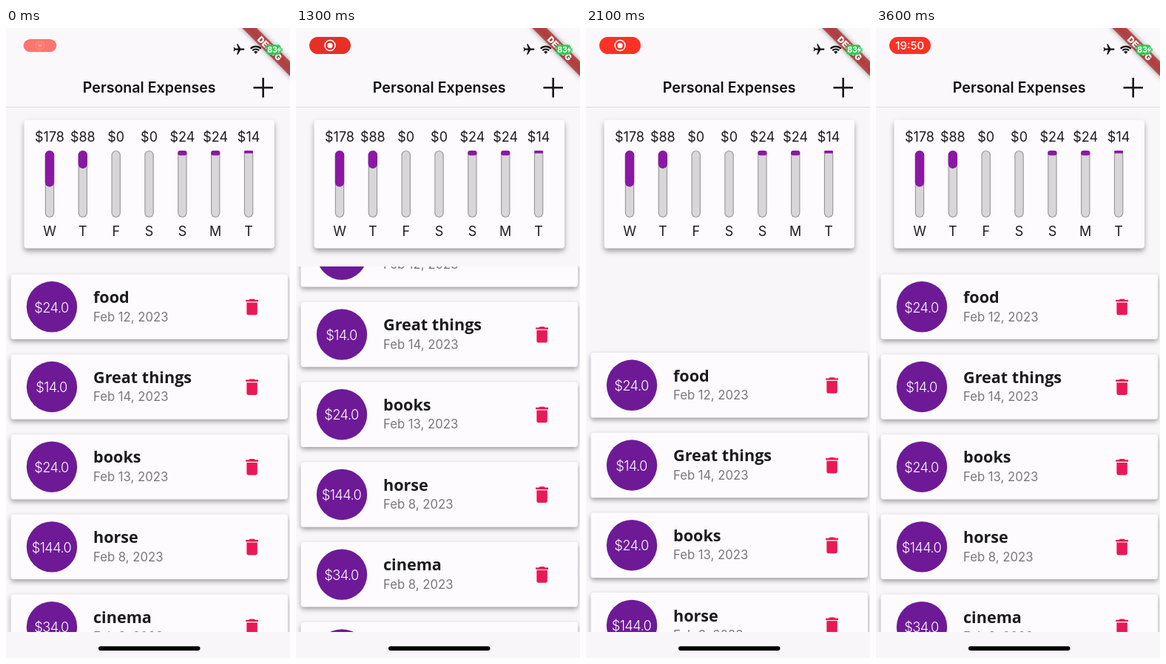
Recreate the animation shown at these times as an HTML page with a canvas. Size 384 by 848 pixels, loop 3700 ms.

```html
<!DOCTYPE html>
<html lang="en">
<head>
<meta charset="utf-8">
<title>Personal Expenses</title>
<style>
html, body { margin: 0; width: 100%; height: 100%; overflow: hidden; background: #f9f6fa; }
canvas { display: block; width: 384px; height: 848px; }
</style>
</head>
<body>
<canvas id="stage"></canvas>
<script>
const W = 384, H = 848, LOOP = 3700, STEP = 100;
const canvas = document.getElementById('stage');
const g = canvas.getContext('2d');
const dpr = window.devicePixelRatio || 1;
canvas.width = W * dpr;
canvas.height = H * dpr;

const BG = '#f9f6fa', CARD = '#fdfbfe', INK = '#1c1b1e';
const LIST_TOP = 321, LIST_BOTTOM = 813, PITCH = 107.7;
const UI = 'Inter, sans-serif';

const items = [
  ['food', '$24.0', 'Feb 12, 2023'],
  ['Great things', '$14.0', 'Feb 14, 2023'],
  ['books', '$24.0', 'Feb 13, 2023'],
  ['horse', '$144.0', 'Feb 8, 2023'],
  ['cinema', '$34.0', 'Feb 8, 2023'],
  ['dog', '$88.0', 'Feb 9, 2023']
];
const days = [['W', 178], ['T', 88], ['F', 0], ['S', 0], ['S', 24], ['M', 24], ['T', 14]];
const total = days.reduce((sum, d) => sum + d[1], 0);

const trash = new Path2D('M6 19c0 1.1.9 2 2 2h8c1.1 0 2-.9 2-2V7H6v12zM19 4h-3.5l-1-1h-5l-1 1H5v2h14V4z');
const plane = new Path2D('M21 16v-2l-8-5V3.5c0-.83-.67-1.5-1.5-1.5S10 2.67 10 3.5V9l-8 5v2l8-2.5V19l-2 1.5V22l3.5-1 3.5 1v-1.5L13 19v-5.5l8 2.5z');
const bolt = new Path2D('M3.4 0L0 5h2.2L1.4 9L5 3.6H2.7z');

const clamp = x => Math.max(0, Math.min(1, x));
const ramp = (t, a, b) => clamp((t - a) / (b - a));
const mix = (a, b, u) => a + (b - a) * u;

function text(str, x, y, font, color, align = 'left', spacing = 0) {
  g.font = font;
  g.fillStyle = color;
  g.textAlign = align;
  g.letterSpacing = spacing + 'px';
  g.fillText(str, x, y);
}

function box(x, y, w, h, r, color) {
  g.fillStyle = color;
  g.beginPath();
  g.roundRect(x, y, w, h, r);
  g.fill();
}

function disc(x, y, r, color) {
  g.fillStyle = color;
  g.beginPath();
  g.arc(x, y, r, 0, Math.PI * 2);
  g.fill();
}

function icon(path, x, y, scale, color, angle = 0) {
  g.save();
  g.translate(x, y);
  g.rotate(angle);
  g.scale(scale, scale);
  g.translate(-12, -12);
  g.fillStyle = color;
  g.fill(path);
  g.restore();
}

function card(x, y, w, h, drop) {
  g.save();
  g.shadowColor = 'rgba(0,0,0,.36)';
  g.shadowBlur = (drop + 3) * dpr;
  g.shadowOffsetY = drop * dpr;
  box(x, y, w, h, 4, CARD);
  g.restore();
}

// Flick up, pull down past the top, then a critically damped spring back.
function scrollAt(t) {
  if (t < 1600) return -161 * (1 - (1 - ramp(t, 1200, 1600)) ** 2);
  if (t < 2100) return mix(-161, 105.5, (1 - Math.cos(Math.PI * ramp(t, 1600, 2100))) / 2);
  const x = (t - 2100) * 0.0115;
  return 105.5 * (1 + x) * Math.exp(-x);
}

function drawChart() {
  card(24.5, 123.5, 338.5, 173, 4);
  days.forEach(([day, sum], i) => {
    const x = 59 + i * 44.85;
    text('$' + sum, x, 152.5, '18px ' + UI, INK, 'center');
    text(day, x, 279.5, '18px ' + UI, INK, 'center');
    box(x - 6.2, 165, 12.4, 90, 6.2, '#969498');
    box(x - 5.1, 166.1, 10.2, 87.8, 5.1, '#d8d6d9');
    if (sum) box(x - 6.2, 165, 12.4, 90 * sum / total, 6.2, '#8b18a3');
  });
}

function drawItem([name, amount, date], y) {
  card(6.5, y, 374.5, 87.5, 3);
  disc(62, y + 43.8, 34.2, '#6e1a97');
  text(amount, 61.5, y + 51, '300 18.3px ' + UI, '#fff', 'center', -0.6);
  text(name, 118, y + 38.5, '700 21.6px "Open Sans", sans-serif', INK);
  text(date, 118, y + 63, '16.7px ' + UI, '#79777b');
  icon(trash, 332.6, y + 44, 1.2, '#e91956');
}

function drawList(t) {
  g.save();
  g.beginPath();
  g.rect(0, LIST_TOP, W, LIST_BOTTOM - LIST_TOP);
  g.clip();
  const top = 331.5 + scrollAt(t);
  items.forEach((item, i) => drawItem(item, top + i * PITCH));
  g.restore();
}

function drawNav() {
  g.fillStyle = '#faf8fb';
  g.fillRect(0, 0, W, 106);
  g.fillStyle = '#dedce0';
  g.fillRect(0, 106, W, 1);
  text('Personal Expenses', 193.7, 87, '600 19.6px ' + UI, '#111', 'center');
  g.fillStyle = '#161616';
  g.fillRect(334.5, 79, 26.5, 2.6);
  g.fillRect(346.4, 67, 2.6, 26.5);
}

function drawBanner() {
  g.save();
  g.translate(W, 0);
  g.rotate(Math.PI / 4);
  g.shadowColor = 'rgba(0,0,0,.6)';
  g.shadowBlur = 7 * dpr;
  g.fillStyle = 'rgba(183,28,28,.7)';
  g.fillRect(-50, 31.8, 100, 13.9);
  g.shadowColor = 'transparent';
  text('DEBUG', 0, 43, '900 11.8px ' + UI, '#fff', 'center');
  g.restore();
}

function drawWifi(x, y) {
  const a = Math.PI * 0.25;
  g.strokeStyle = '#111';
  g.lineWidth = 2.2;
  for (const r of [6.3, 10]) {
    g.beginPath();
    g.arc(x, y, r, -Math.PI / 2 - a, -Math.PI / 2 + a);
    g.stroke();
  }
  g.fillStyle = '#111';
  g.beginPath();
  g.moveTo(x, y);
  g.arc(x, y, 3.7, -Math.PI / 2 - a, -Math.PI / 2 + a);
  g.fill();
}

function drawStatus() {
  icon(plane, 315, 29, 0.74, '#111', Math.PI / 2);
  drawWifi(337.7, 34.8);
  box(352, 22.5, 19.5, 13.5, 4, '#35c759');
  box(372.2, 27, 1.5, 4.5, 0.7, '#35c759');
  text('83', 353.3, 33.3, '600 11px ' + UI, '#fff', 'left', -0.4);
  g.save();
  g.translate(366.6, 25);
  g.fillStyle = '#fff';
  g.fill(bolt);
  g.restore();
}

function drawPill(t) {
  const grow = ramp(t, 0, 300);
  const pulse = clamp(0.75 * (1 - Math.cos(2 * Math.PI * (t - 1000) / 1700)));
  const clock = ramp(t, 2800, 3150);
  const fade = mix(0.65, 1, grow);
  g.save();
  g.translate(46, 23.6);
  g.scale(mix(0.8, 1, grow), mix(0.75, 1, grow));
  g.globalAlpha = fade;
  box(-28, -11.5, 56, 23, 11.5, `rgb(${mix(214, 254, pulse)},${mix(45, 49, pulse)},${mix(39, 37, pulse)})`);
  g.globalAlpha = fade * (1 - clock ** 1.5) * mix(0.3, 1, grow);
  g.strokeStyle = '#fff';
  g.lineWidth = 1.5;
  g.beginPath();
  g.arc(0, 0, 7, 0, Math.PI * 2);
  g.stroke();
  disc(0, 0, 3.6, '#fff');
  g.globalAlpha = clock;
  text('19:50', -0.3, 5.3, '500 15px ' + UI, '#fff', 'center');
  g.restore();
}

function draw(t) {
  g.setTransform(dpr, 0, 0, dpr, 0, 0);
  g.fillStyle = BG;
  g.fillRect(0, 0, W, H);
  drawList(t);
  drawChart();
  drawNav();
  g.fillStyle = '#f8f6f9';
  g.fillRect(0, LIST_BOTTOM, W, H - LIST_BOTTOM);
  box(125, 832.3, 137.5, 5.6, 2.8, '#000');
  drawBanner();
  drawStatus();
  drawPill(t);
}

const start = performance.now();
function tick() {
  const t = (performance.now() - start) % LOOP;
  draw(Math.floor(t / STEP) * STEP);
  requestAnimationFrame(tick);
}
tick();
</script>
</body>
</html>
```
